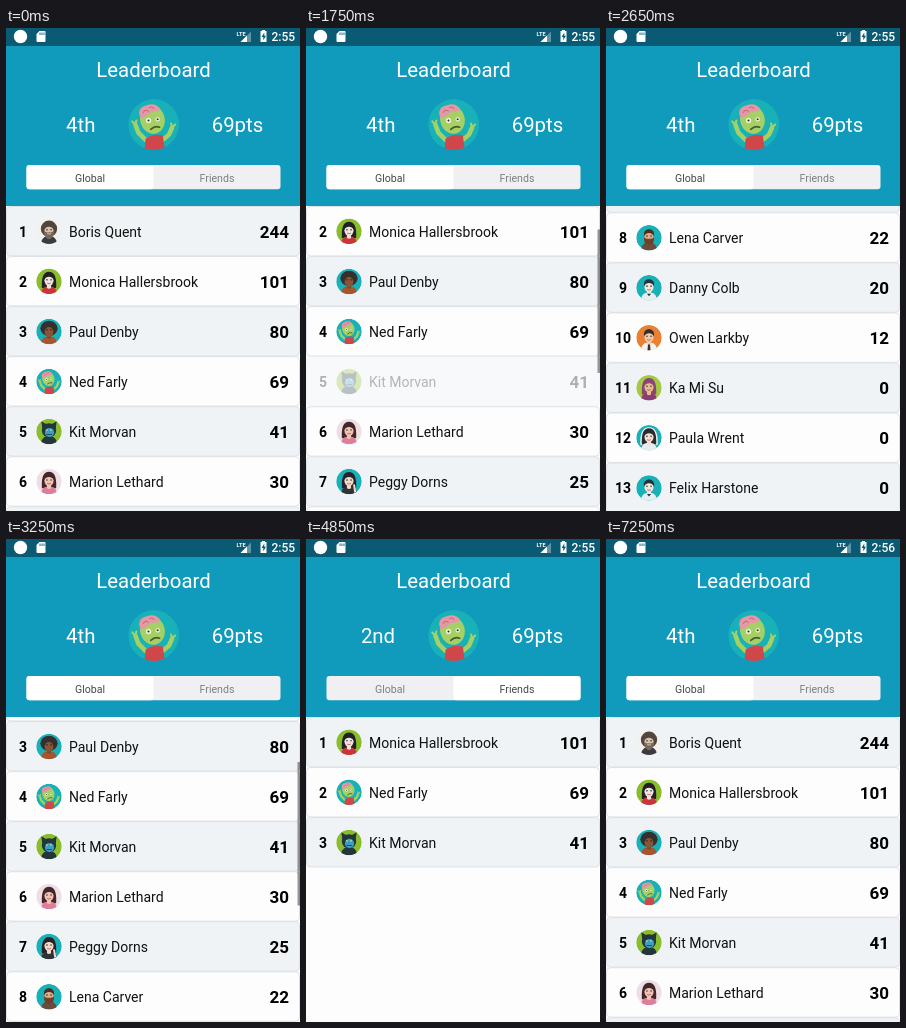
These frames come from a looping animation (294x483 px, 8 s). An HTML page:

```html
<!DOCTYPE html>
<html lang="en">
<head>
<meta charset="utf-8">
<title>Leaderboard</title>
<style>
  html, body { margin: 0; width: 294px; height: 483px; overflow: hidden; background: #fdfdfe; }
  svg { display: block; font-family: Roboto, sans-serif; }
  .big { font-size: 20.4px; fill: #fff; text-anchor: middle; }
  .tab { font-size: 10.6px; text-anchor: middle; }
  .rank { font-size: 14px; font-weight: 700; text-anchor: middle; }
  .name { font-size: 14px; fill: #111; }
  .score { font-size: 17px; font-weight: 700; text-anchor: end; }
</style>
</head>
<body>
<svg width="294" height="483" viewBox="0 0 294 483">
  <defs>
    <clipPath id="disc"><circle r="25"/></clipPath>
    <clipPath id="view"><rect y="178" width="294" height="305"/></clipPath>
  </defs>
  <rect width="294" height="483" fill="#fdfdfe"/>
  <g clip-path="url(#view)">
    <g id="global"></g>
    <g id="friends"></g>
    <rect id="bar" x="291.5" width="2.5" height="143.5" fill="#000" fill-opacity=".4"/>
  </g>

  <rect width="294" height="178" fill="#109abc"/>
  <rect width="294" height="18" fill="#0b5a73"/>
  <g fill="#fff">
    <circle cx="14.5" cy="8.5" r="6.7"/>
    <path d="M33.5 3H38.5Q39.5 3 39.5 4V13Q39.5 14 38.5 14H31.5Q30.5 14 30.5 13V6Z"/>
    <path d="M34 4.5v2.5M36 4.5v2.5M38 4.5v2.5" stroke="#0b5a73" stroke-width=".9"/>
    <text x="230.5" y="7.5" font-size="5.6" font-weight="700">LTE</text>
    <path d="M245 3.5V14H234.5Z" opacity=".35"/>
    <path d="M241 7.5V14H234.5Z"/>
    <path d="M254.5 3h1.5V2h3v1h1.5V14h-6Z"/>
    <path d="M258.3 4.5 255.6 9h1.7v3.2L260 7.8h-1.7Z" fill="#0b5a73"/>
    <text id="clock" x="265.5" y="12.8" font-size="12" font-weight="500"></text>
  </g>
  <text class="big" x="147.5" y="49">Leaderboard</text>
  <text class="big" id="place" y="104"></text>
  <text class="big" x="231.5" y="104">69pts</text>
  <g id="me" transform="translate(147.7 96.5) scale(1.02)"></g>

  <rect x="20.5" y="137" width="254" height="24.3" rx="3" fill="#f0f0f3"/>
  <rect id="pick" y="137" width="127" height="24.3" rx="3" fill="#fff"/>
  <text class="tab" id="tabA" x="84" y="153.6">Global</text>
  <text class="tab" id="tabB" x="211" y="153.6">Friends</text>
</svg>
<script>
const $ = id => document.getElementById(id);
const LOOP = 8000, STEP = 50, ROW = 50.05, TOP = 178.3;
const TO_FRIENDS = 4850, TO_GLOBAL = 7250, MINUTE = 5800;

const oval = (x, y, rx, ry, fill) => `<ellipse cx="${x}" cy="${y}" rx="${rx}" ry="${ry}" fill="${fill}"/>`;
const path = (d, fill) => `<path d="${d}" fill="${fill}"/>`;
const line = (d, color, w) =>
  `<path d="${d}" fill="none" stroke="${color}" stroke-width="${w}" stroke-linecap="round"/>`;
const eyes = (color = '#222') => oval(-4, -3, 1.4, 1.6, color) + oval(4, -3, 1.4, 1.6, color);
const bust = color => path('M-16 25Q-15 12 -5 10H5Q15 12 16 25Z', color);
const neck = skin => path('M-4 5H4V13Q0 16 -4 13Z', skin);
const face = skin => oval(0, -2, 9, 11, skin);
const fringe = hair => path('M-10 -2Q-12 -16 0 -17Q12 -16 10 -2Q7 -9 0 -9Q-7 -9 -10 -2Z', hair);
const person = (hair, skin, shirt, extra = '') =>
  bust(shirt) + neck(skin) + face(skin) + fringe(hair) + eyes() + extra;
const longHair = (hair, skin, shirt, extra = '') =>
  path('M-14 13Q-16 -19 0 -19Q16 -19 14 13Z', hair) + person(hair, skin, shirt, extra);
const smile = line('M-3 4Q0 6 3 4', '#a8403f', 1.3);
const beard = c => path('M-10 -1Q-6 3 0 2Q6 3 10 -1Q11 13 0 15Q-11 13 -10 -1Z', c);

const zombie =
  line('M-8 15L-15 8L-18 0M9 15L15 10L18 3', '#a5d065', 4.5) +
  line('M-18 0l-3 -3M-18 0l1 -4M18 3l3 -3M18 3l-1 -4', '#a5d065', 2) +
  path('M-9 25L-8 14Q0 8 9 11L11 25Z', '#cf464b') +
  '<g transform="rotate(-14)">' +
  oval(0, -5, 12, 14, '#a5d065') +
  path('M-11 -9Q-13 -20 -2 -20Q7 -21 10 -13Q4 -10 1 -13Q-4 -9 -11 -9Z', '#e697a6') +
  line('M-7 -14q3 -3 5 0M0 -17q3 -1 4 2', '#c56a80', 1) +
  oval(-4, -5, 2.6, 2.6, '#eef3cf') + oval(5, -4, 2.2, 2.2, '#eef3cf') +
  oval(-4, -5, 1, 1, '#333') + oval(5, -4, 1, 1, '#333') +
  line('M-4 4Q1 1 5 4', '#4d5b2a', 1.6) + '</g>';

const goth = longHair('#242025', '#f1e4df', '#c9343d', smile);
const imp =
  path('M-13 -5L-15 -20L-5 -14H5L15 -20L13 -5Z', '#24363d') + bust('#24363d') +
  oval(0, -2, 14, 14, '#24363d') + oval(1, 2, 9, 9, '#3b9fc0') +
  eyes('#e9f5a8') + line('M-4 6H5', '#1d3036', 1.5);
const lad = person('#27323a', '#f1e7e0', '#e6eef0',
  path('M-4 12H4L0 17Z', '#27323a') + smile);

const TEAL = '#18b1b8', LIME = '#8abd2b';
// name, score, disc colour, portrait
const people = [
  ['Boris Quent', 244, '#f3f1ee', oval(0, -5, 16, 16, '#50463f') +
    person('#50463f', '#dcc0a5', '#3b3a3e', beard('#75685d') + line('M-3 5H3', '#e9d7c7', 1.6))],
  ['Monica Hallersbrook', 101, LIME, goth],
  ['Paul Denby', 80, TEAL, bust('#a8552f') + oval(0, -6, 17, 15, '#35302f') +
    neck('#7c4a30') + oval(0, 1, 8.5, 9.5, '#8a5436') + eyes()],
  ['Ned Farly', 69, TEAL, zombie],
  ['Kit Morvan', 41, LIME, imp],
  ['Marion Lethard', 30, '#efdfe5', longHair('#44272b', '#f0c3b4', '#dd7f9b', smile)],
  ['Peggy Dorns', 25, TEAL, longHair('#28232a', '#f3d9cb', '#2f3138',
    smile + line('M12 20L10 7', '#f3d9cb', 4))],
  ['Lena Carver', 22, TEAL, person('#4d3025', '#e3ad86', '#6b4b3c', beard('#6b3f2a') + smile)],
  ['Danny Colb', 20, TEAL, lad],
  ['Owen Larkby', 12, '#ea8132', person('#35302f', '#f0cba9', '#f5f2f0',
    path('M-2 13H2L3 25H-3Z', '#333') + smile)],
  ['Ka Mi Su', 0, '#a6c944', longHair('#8b4577', '#e6bd8e', '#8b3c75', smile)],
  ['Paula Wrent', 0, TEAL, path('M-17 14Q-19 -21 0 -21Q19 -21 17 14Z', '#eef3f1') +
    longHair('#2b2c31', '#f2e1d4', '#e8eeee', smile)],
  ['Felix Harstone', 0, TEAL, lad]
];

const avatar = p => `<g clip-path="url(#disc)"><circle r="25" fill="${p[2]}"/>${p[3]}</g>`;
const row = (p, i) => `<g transform="translate(0 ${TOP + i * ROW})">
  <rect x=".5" y=".2" width="293" height="49.4" rx="4" fill="${i % 2 ? '#fdfdfe' : '#eff3f5'}" stroke="#dde1e4"/>
  <text class="rank" x="17" y="30.3">${i + 1}</text>
  <g transform="translate(43 25) scale(.51)">${avatar(p)}</g>
  <text class="name" x="63" y="30.3">${p[0]}</text>
  <text class="score" x="283" y="31.3">${p[1]}</text></g>`;

$('global').innerHTML = people.map(row).join('');
$('friends').innerHTML = [1, 3, 4].map(n => people[n]).map(row).join('');
$('me').innerHTML = avatar(people[3]);
const pressed = $('global').children[4];

const easeIn = p => p * p;
const easeOut = p => 1 - (1 - p) ** 2;
const easeBoth = p => p * p * (3 - 2 * p);

// time, value, easing towards that value
const scroll = [[0, 0], [1575, 0], [1750, 50, easeIn], [2300, 344, easeOut],
  [3025, 344], [3250, 96, easeOut], [3350, 96], [3600, 0, easeBoth]];
const dim = [[0, 1], [1575, 1], [1750, .3], [2000, 1]];
const bar = [[0, 0], [1599, 0], [1600, 1], [2425, 1], [2650, 0],
  [3049, 0], [3050, 1], [3925, 1], [4350, 0]];

function at(keys, t) {
  const i = keys.findIndex(k => k[0] > t);
  if (i < 0) return keys[keys.length - 1][1];
  const [t0, a] = keys[i - 1], [t1, b, ease = p => p] = keys[i];
  return a + (b - a) * ease((t - t0) / (t1 - t0));
}

function draw(now) {
  const t = Math.floor(now % LOOP / STEP) * STEP;
  const friends = t >= TO_FRIENDS && t < TO_GLOBAL;
  const y = at(scroll, t);
  $('global').setAttribute('transform', `translate(0 ${-y})`);
  $('global').style.display = friends ? 'none' : '';
  $('friends').style.display = friends ? '' : 'none';
  pressed.setAttribute('opacity', at(dim, t));
  $('bar').setAttribute('y', 178 + y * 305 / (ROW * people.length));
  $('bar').setAttribute('opacity', at(bar, t));
  $('place').textContent = friends ? '2nd' : '4th';
  $('place').setAttribute('x', friends ? 72 : 74.7);
  $('pick').setAttribute('x', friends ? 147.5 : 20.5);
  $('tabA').setAttribute('fill', friends ? '#7b7f84' : '#43484d');
  $('tabB').setAttribute('fill', friends ? '#43484d' : '#7b7f84');
  $('clock').textContent = t >= MINUTE ? '2:56' : '2:55';
}

const start = performance.now();
function tick() {
  draw(performance.now() - start);
  requestAnimationFrame(tick);
}
tick();
</script>
</body>
</html>
```
